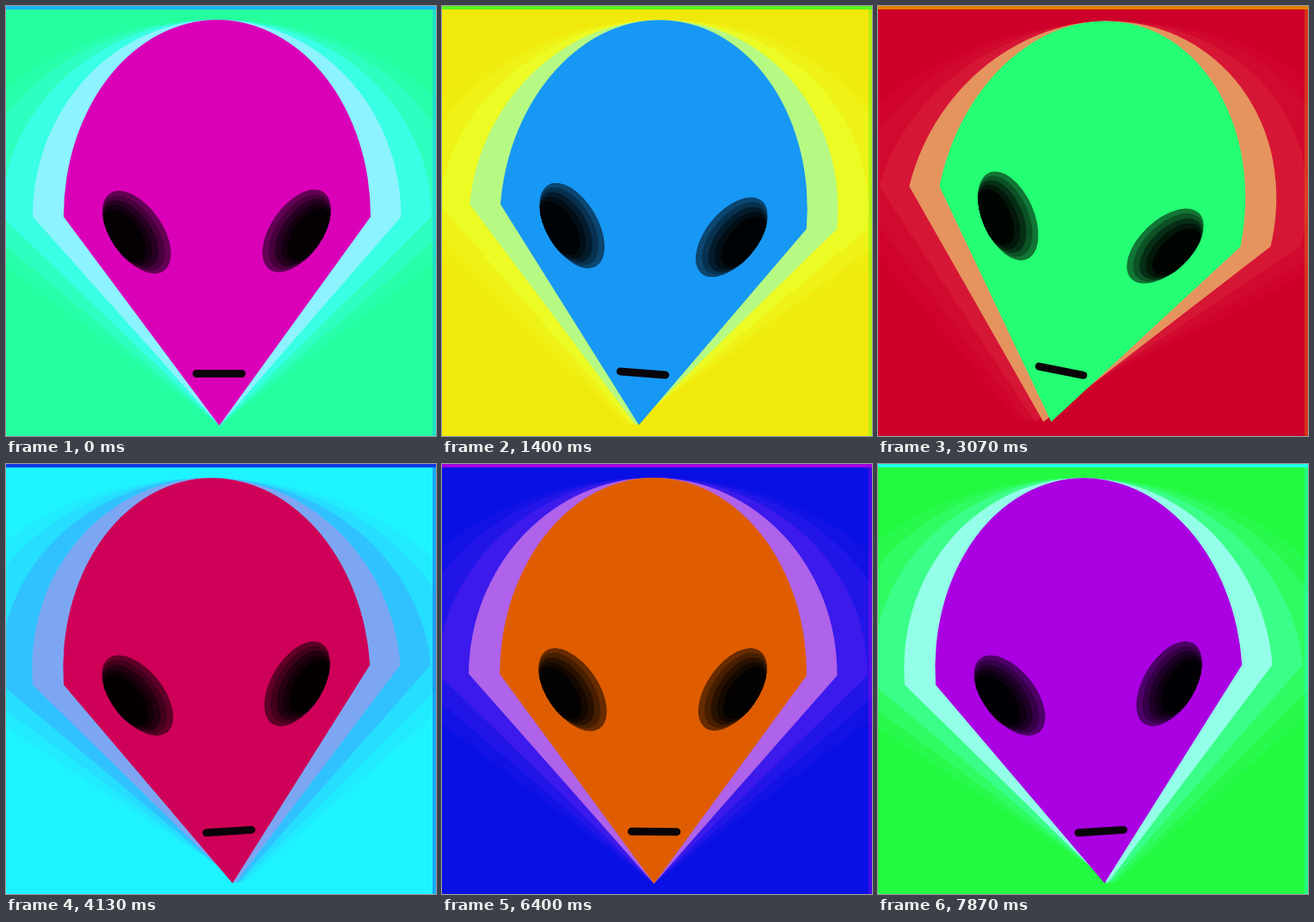
Write an HTML page with a canvas that moves like this. It is 500 px wide and 500 px high and loops after 7.93 s.

```html
<!DOCTYPE html>
<html lang="en">
<head>
<meta charset="utf-8">
<title>Alien</title>
<style>
  html, body { margin: 0; width: 100%; height: 100%; overflow: hidden; }
  canvas { display: block; width: 100vw; height: 100vh; }
</style>
</head>
<body>
<canvas id="stage" width="500" height="500"></canvas>
<script>
const ctx = document.getElementById('stage').getContext('2d');
const LOOP = 7930, FPS = 15, TAU = Math.PI * 2;
const PIVOT = { x: 247, y: 250 };
const rad = d => d * Math.PI / 180;
const cosd = d => Math.cos(rad(d));

// Pure hue between a floor and a peak that both depend on the hue.
function tone(hue, lift = 0, gain = 1) {
  const hi = Math.min(255, 234 + 22 * cosd(hue - 150) + 8 * cosd(3 * (hue - 171)));
  const lo = Math.max(0, 10 + 26 * cosd(hue - 145)) + lift;
  const part = shift => {
    const k = (((hue + shift) % 360 + 360) % 360) / 60;
    const level = Math.min(1, Math.max(0, Math.abs(k - 3) - 1));
    return Math.min(255, Math.round((lo + (hi - lo) * level) * gain));
  };
  return `rgb(${part(0)},${part(240)},${part(120)})`;
}

// Eased swing with a small counter-move first, then back again.
function tilt(frame) {
  const p = (frame % 30) / 15;
  const x = p > 1 ? 2 - p : p;
  const s = 0.5 - Math.sin(Math.asin(1 - 2 * x) / 3);
  const r = 1 - s;
  return 3 * r * r * s * -14.6 + 3 * r * s * s * 17.5 + s * s * s * 10.6;
}

// Head outline, turned first and then stretched sideways.
function fillHead(angle, stretch, color, alpha = 1) {
  ctx.save();
  ctx.translate(PIVOT.x, PIVOT.y);
  ctx.scale(stretch, 1);
  ctx.rotate(rad(angle));
  ctx.translate(-PIVOT.x, -PIVOT.y);
  ctx.globalAlpha = alpha;
  ctx.fillStyle = color;
  ctx.beginPath();
  ctx.ellipse(245.5, 245, 178.5, 229, 0, Math.PI, TAU);
  ctx.lineTo(248, 488);
  ctx.closePath();
  ctx.fill();
  ctx.restore();
}

function oval(x, y, rx, ry) {
  ctx.beginPath();
  ctx.ellipse(x, y, rx, ry, 0, 0, TAU);
}

function drawEye(x, y, side, hue) {
  ctx.save();
  ctx.translate(x, y);
  ctx.rotate(rad(35 * side));
  oval(0, 0, 30, 55);
  ctx.clip();
  [0.46, 0.32, 0.18, 0.09, 0.02].forEach((dim, i) => {
    ctx.fillStyle = tone(hue, 0, dim);
    oval(side * i * 3.5, -i * 1.2, 30 - i * 3, 55 - i * 5);
    ctx.fill();
  });
  ctx.restore();
}

function drawFace(angle, hue) {
  ctx.save();
  ctx.translate(PIVOT.x, PIVOT.y);
  ctx.rotate(rad(angle));
  ctx.translate(-PIVOT.x, -PIVOT.y);
  drawEye(152, 263, -1, hue);
  drawEye(338, 261.5, 1, hue);
  ctx.strokeStyle = '#080408';
  ctx.lineWidth = 9;
  ctx.lineCap = 'round';
  ctx.beginPath();
  ctx.moveTo(221.5, 427.5);
  ctx.lineTo(274, 427.5);
  ctx.stroke();
  ctx.restore();
}

function draw(frame) {
  const turn = 311 + frame * 12;
  const hue = turn + 2 * cosd(2 * (turn - 205));
  const back = turn + 208 + 7 * cosd(2 * turn - 40);
  const angle = tilt(frame);

  ctx.fillStyle = tone(back);
  ctx.fillRect(0, 0, 500, 500);

  const glow = tone(back + 10 - 8 * cosd(back + 10), 24, 1.05);
  fillHead(angle, 1.8, glow, 0.15);
  fillHead(angle, 1.6, glow, 0.3);
  fillHead(angle, 1.4, glow, 0.8);
  fillHead(angle, 1.2, tone(back + 36, 98 + 10 * cosd(back - 130), 1.03));

  ctx.fillStyle = tone(back + 45);
  ctx.fillRect(0, 0, 500, 4);
  ctx.globalAlpha = 0.4;
  ctx.fillRect(496, 4, 4, 496);
  ctx.globalAlpha = 1;

  fillHead(angle, 1, tone(hue));
  drawFace(angle, hue);
}

function tick() {
  const t = (performance.now() - start) % LOOP;
  draw(Math.floor(t * FPS / 1000 + 0.06));
  requestAnimationFrame(tick);
}

const start = performance.now();
tick();
</script>
</body>
</html>
```
